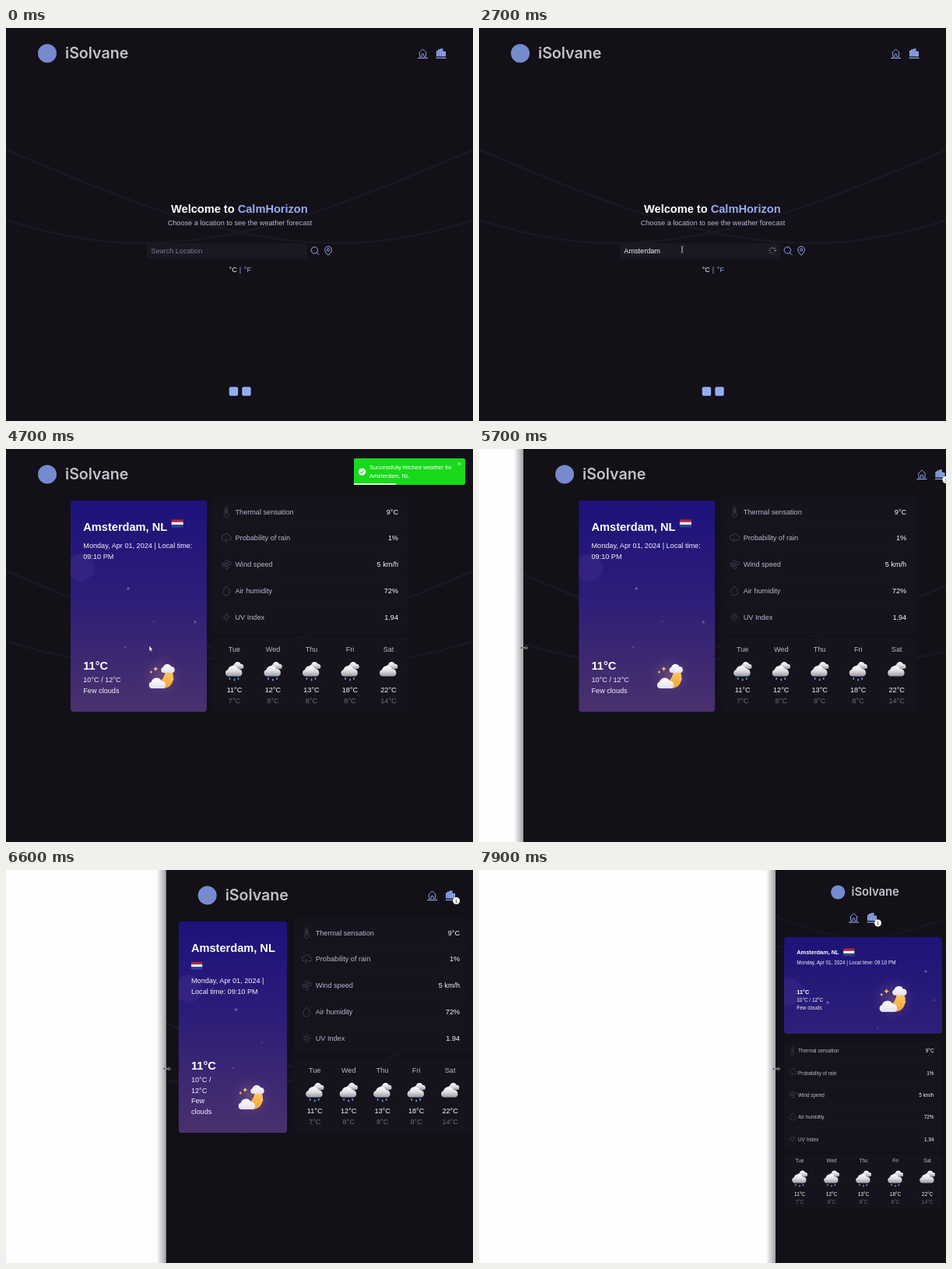
Recreate the animation shown at these times as an HTML page. Size 600 px wide and 504 px high, loop 8 s.

```html
<!DOCTYPE html>
<html lang="en">
<head>
<meta charset="utf-8">
<title>Weather app</title>
<style>
html, body { margin: 0; width: 100%; height: 100%; overflow: hidden; background: #131018; }
svg { display: block; width: 600px; height: 504px; font-family: "Liberation Sans", Arial, sans-serif; }
</style>
</head>
<body>
<svg viewBox="0 0 600 504">
  <defs>
    <linearGradient id="night" x2="0" y2="1">
      <stop stop-color="#1d127b"/><stop offset=".45" stop-color="#2d1d78"/><stop offset="1" stop-color="#4a316d"/>
    </linearGradient>
    <linearGradient id="nightWide" x2="0" y2="1">
      <stop stop-color="#1e1377"/><stop offset="1" stop-color="#2d2079"/>
    </linearGradient>
    <linearGradient id="puff" x2="0" y2="1">
      <stop stop-color="#fff"/><stop offset=".5" stop-color="#dedde2"/><stop offset="1" stop-color="#9b99a2"/>
    </linearGradient>
    <linearGradient id="white" x2="0" y2="1">
      <stop stop-color="#fff"/><stop offset="1" stop-color="#e3dfee"/>
    </linearGradient>
    <linearGradient id="gold" x2="0" y2="1">
      <stop stop-color="#ffd667"/><stop offset="1" stop-color="#f4a23a"/>
    </linearGradient>
    <radialGradient id="glow">
      <stop stop-color="#d8a08c" stop-opacity=".28"/><stop offset="1" stop-color="#8a5a90" stop-opacity="0"/>
    </radialGradient>
    <linearGradient id="shade">
      <stop stop-color="#000" stop-opacity="0"/><stop offset="1" stop-color="#000" stop-opacity=".36"/>
    </linearGradient>
    <path id="cloud" d="M-8,6 A4.5,4.5 0 0 1 -8,-2.5 A7,7 0 0 1 5,-3.5 A5,5 0 0 1 7.5,6Z"/>
    <g id="overcast">
      <use href="#cloud" fill="url(#puff)" transform="translate(5 -6) scale(.66)"/>
      <use href="#cloud" fill="url(#puff)" transform="translate(-.5 1.5)"/>
    </g>
    <path id="drops" d="M-6,10v1M0,11.5v1M5,10v1" stroke="#6f93d6" stroke-width="1.8" stroke-linecap="round"/>
    <g id="moonCloud">
      <circle r="27" fill="url(#glow)"/>
      <path d="M4,-13 C17,-9 18,8 9,14 C2,18 -8,16 -11,8 C0,10 6,0 4,-13Z" fill="url(#gold)"/>
      <use href="#cloud" fill="url(#white)" transform="translate(8 -9) scale(.82)"/>
      <use href="#cloud" fill="url(#white)" transform="translate(-5.5 10)"/>
      <path d="M-8,-12l1,2 2,1-2,1-1,2-1-2-2-1 2-1zM-14,-7l.7,1.3 1.3.7-1.3.7-.7,1.3-.7-1.3-1.3-.7 1.3-.7zM13,1l1,2 2,1-2,1-1,2-1-2-2-1 2-1z" fill="#f7c264"/>
    </g>
    <g id="flag">
      <rect width="15" height="3.4" fill="#b3283a"/><rect y="3.3" width="15" height="3.4" fill="#f2f0f4"/><rect y="6.6" width="15" height="3.4" fill="#2b4692"/>
    </g>
    <g id="home" fill="none" stroke="#93a8ea">
      <path d="M-5,-.5 L0,-5.5 L5,-.5 M-4,-1 V4 H-1.3 V.8 H1.3 V4 H4 V-1" stroke-width=".9"/><path d="M-6.5,6H6.5" stroke-width="1.2"/>
    </g>
    <g id="city">
      <path d="M-6,4V-3.5H-4V-5H-1V-6H2.5V-2.5H6V4Z" fill="#8fa8ee"/>
      <path d="M-4,-2v5.5M-1.8,-3.5v7M.8,-4.5v8M4,-1v4" stroke="#25243b" stroke-width=".7" stroke-dasharray="1 1.1"/>
      <path d="M-6.5,6H6.5" stroke="#93a8ea" stroke-width="1.2"/>
    </g>
    <path id="arrow" d="M0,-3.5v7l1.6-1.5 1.2,2.5 1-.5-1.2-2.3h2z" fill="#fff" stroke="#222" stroke-width=".4"/>
    <path id="beam" d="M-1.5,-4q1.5,0 1.5,1V3q0,1-1.5,1M1.5,-4q-1.5,0-1.5,1V3q0,1 1.5,1" fill="none" stroke="#aaa8b2" stroke-width=".8"/>
    <path id="resize" d="M-5,0l2.5-2v1.5h5v-1.5l2.5,2-2.5,2v-1.5h-5v1.5z" fill="#222" stroke="#ddd" stroke-width=".5"/>
    <clipPath id="cardClip"><rect id="clipBox" rx="4"/></clipPath>
  </defs>
  <g id="scene"></g>
</svg>
<script>
const LOOP = 8000, FRAME = 100;
const PAGE = '#131018', PANEL = '#16131d', RULE = '#1d1a27', ICON = '#3d3b54';
const PALE = '#b9b7cd', BRIGHT = '#f8f8fa', BLUE = '#97abf0', DIM = '#6d6b83';

const scene = document.getElementById('scene');
const clipBox = document.getElementById('clipBox');
const pen = document.createElement('canvas').getContext('2d');

const clamp = (v, lo = 0, hi = 1) => Math.min(hi, Math.max(lo, v));
const easeOut = k => 1 - (1 - k) ** 3;

// Piecewise linear interpolation through [time, value] pairs.
function track(t, keys) {
  if (t <= keys[0][0]) return keys[0][1];
  for (let i = 1; i < keys.length; i++) {
    const [t0, a] = keys[i - 1], [t1, b] = keys[i];
    if (t <= t1) return a + (b - a) * (t - t0) / (t1 - t0);
  }
  return keys[keys.length - 1][1];
}

const rect = (x, y, w, h, fill, extra = '') =>
  `<rect x="${x}" y="${y}" width="${w}" height="${h}" fill="${fill}" ${extra}/>`;
const use = (id, x, y, scale = 1) =>
  `<use href="#${id}" transform="translate(${x} ${y}) scale(${scale})"/>`;
const text = (s, x, y, size, fill, extra = '') =>
  `<text x="${x}" y="${y}" font-size="${size}" fill="${fill}" ${extra}>${s}</text>`;
const BOLD = 'font-weight="bold"', MID = 'text-anchor="middle"', END = 'text-anchor="end"';

function widthOf(s, size, bold) {
  pen.font = `${bold ? 'bold ' : ''}100px "Liberation Sans", Arial, sans-serif`;
  return pen.measureText(s).width * size / 100;
}

function wrap(s, room, size, bold) {
  const lines = [];
  for (const word of s.split(' ')) {
    const last = lines[lines.length - 1];
    const joined = `${last} ${word}`;
    if (last && widthOf(joined, size, bold) <= room) lines[lines.length - 1] = joined;
    else lines.push(word);
  }
  return lines;
}

const LAYOUTS = {
  wide: { big: 14.6, size: 9.13, cardTop: 66, cardBottom: 337, titleY: 105, dateGap: 22, lastUp: 24, tempGap: 16,
    nightUp: 46, nightScale: 1, rowY: 83.5, rowStep: 33.8, panelTop: 62, panelH: 174, inset: 27.5, dayY: 259.5, skyY: 284, skyScale: 1,
    highY: 312, lowY: 325.5, dayTop: 241, dayH: 96, pad: 36, logoY: 32.5, logoScale: 1, iconY: 32.5 },
  medium: { big: 9.13, size: 7.35, cardTop: 62, cardBottom: 315, titleY: 96, dateGap: 21, lastUp: 12.5, tempGap: 12,
    nightUp: 50, nightScale: .5, rowY: 79.5, rowStep: 33.8, panelTop: 58, panelH: 174, inset: 22, dayY: 253.5, skyY: 271, skyScale: .78,
    highY: 293.5, lowY: 304.5, dayTop: 236, dayH: 79, pad: 32, logoY: 30.5, logoScale: .88, iconY: 30.5 },
  narrow: { big: 7.35, size: 6.4, cardTop: 86, cardBottom: 210, titleY: 108, dateGap: 12.5, lastUp: 31.5, tempGap: 10.4,
    nightUp: 45, nightScale: 1.06, rowY: 234.3, rowStep: 28.3, panelTop: 220, panelH: 140, inset: 20, dayY: 374.5, skyY: 395, skyScale: .86,
    highY: 418, lowY: 428, dayTop: 364, dayH: 71, logoY: 28.5, logoScale: .755, iconY: 61 }
};

function frameOf(t) {
  const left = track(t, [[5350, 0], [5700, 57], [6200, 151], [7100, 274], [7900, 381]]);
  const mid = track(t, [[5350, 300.5], [5700, 345.7], [6200, 384.5], [7100, 440.5], [7900, 493.5]]);
  const width = 2 * (mid - left);
  const kind = width >= 351 ? 'wide' : width >= 292 ? 'medium' : 'narrow';
  return { left, mid, width, kind, ...LAYOUTS[kind] };
}

function curves(f) {
  const d = 'M-300.5,156 C-150,219 -20,276 130,276 C190,276 250,262 300,246.5';
  const fit = f.kind === 'narrow' ? 'translate(0 -52) scale(.6 .55)' : '';
  return `<g transform="translate(${f.mid} 0) ${fit}" fill="none" stroke="#1b1825" stroke-width="2.6">
    <path d="${d}"/><path d="${d}" transform="scale(-1 1)"/></g>`;
}

function header(f, badge) {
  const stacked = f.kind === 'narrow', half = (f.width - f.pad * 2) / 2;
  const x = stacked ? f.mid - 45.5 : f.mid - half - .5;
  const right = stacked ? f.mid + 18 : f.mid + half + .5;
  const cityX = right - 6.5;
  return `<g transform="translate(${x} ${f.logoY}) scale(${f.logoScale})">
      <circle cx="17.5" r="12" fill="#768bce"/>
      <text x="40.5" y="6" font-family="Inter, sans-serif" font-weight="600" font-size="19.6" fill="#c3c2c9">iSolvane</text></g>` +
    use('home', right - 30, f.iconY) + use('city', cityX, f.iconY) +
    (badge ? `<circle cx="${cityX + 7.5}" cy="${f.iconY + 7}" r="4.5" fill="#f4f4f6"/>` +
      text('1', cityX + 7.5, f.iconY + 9.2, 6, '#222', MID) : '');
}

function spinner(t) {
  let s = '';
  for (let i = 0; i < 8; i++) {
    const fade = ((i - Math.floor(t / FRAME)) % 8 + 8) % 8;
    s += `<path d="M0,-2.5V-5" transform="rotate(${i * 45})" stroke="#c9c8d4" opacity="${.15 + fade * .1}"/>`;
  }
  return `<g transform="translate(377 285.5)">${s}</g>`;
}

function homePage(t) {
  const typed = 'Amsterdam'.slice(0, clamp(Math.floor((t - 1700) / 700 * 9), 0, 9));
  let s = text(`Welcome to <tspan fill="${BLUE}">CalmHorizon</tspan>`, 212, 237, 14.6, '#fff', BOLD) +
    text('Choose a location to see the weather forecast', 300.5, 253, 9.13, PALE, MID) +
    rect(181, 276, 206, 20, '#1b1824', 'rx="3"') +
    text(typed || 'Search Location', 186.3, 289, 9.13, typed ? BRIGHT : '#7a788e') +
    text('°C', 286.5, 313, 9.13, BRIGHT) + text('|', 299.8, 313, 9.13, BLUE) + text('°F', 305.8, 313, 9.13, BLUE) +
    `<g fill="none" stroke="${BLUE}">
      <circle cx="396.3" cy="285" r="4.2"/><path d="M399.4,288.2l3,3"/>
      <path d="M414,291.5q-4.4,-4.2-4.4,-7a4.4,4.4 0 0 1 8.8,0q0,2.8-4.4,7z"/><circle cx="414" cy="284.5" r="1.6"/></g>` +
    rect(286.7, 460.3, 11.4, 11.4, '#92adf3', 'rx="2"') + rect(303.3, 460.3, 11.4, 11.4, '#92adf3', 'rx="2"');
  const caret = (t >= 1000 && t < 1200) || (t >= 1800 && t < 2700);
  if (caret) s += rect(186.8 + widthOf(typed, 9.13), 281, .7, 10, '#e8e8ee');
  if (t >= 2700) s += spinner(t);
  if (t >= 100) {
    const k = easeOut(clamp((t - 100) / 800));
    const x = 320 - 59 * k, y = 374 - 90 * k;
    s += use(y < 296 ? 'beam' : 'arrow', x, y);
  }
  return s;
}

const ROWS = [
  ['Thermal sensation', '9°C', 'M-1.5,-5a1.5,1.5 0 0 1 3,0V1.5a3,3 0 1 1 -3,0ZM0,-3V4'],
  ['Probability of rain', '1%', 'M-3,2.5a3,3 0 0 1 0,-6a4,4 0 0 1 7.5,1a2.5,2.5 0 0 1 -.5,5H1M0,0l-2,3h2l-1.5,3'],
  ['Wind speed', '5 km/h', 'M-6,-1.5H0a2,2 0 1 0 -2,-2M-6,.5H4a2,2 0 1 0 -2,-2M-5,2.5H1a1.7,1.7 0 1 1 -1.7,1.7'],
  ['Air humidity', '72%', 'M0,-6q4.5,4.5 4.5,7.5a4.5,4.5 0 0 1 -9,0q0,-3 4.5,-7.5z'],
  ['UV Index', '1.94', 'M-2.5,0a2.5,2.5 0 1 0 5,0a2.5,2.5 0 1 0 -5,0M0,-4v-2M0,4v2M-4,0h-2M4,0h2M-3,-3l-1.3,-1.3M3,3l1.3,1.3M-3,3l-1.3,1.3M3,-3l1.3,-1.3']
];
const DAYS = [['Tue', 11, 7], ['Wed', 12, 8], ['Thu', 13, 8], ['Fri', 18, 8], ['Sat', 22, 14]];

function card(f, x, w) {
  const narrow = f.kind === 'narrow', { size, big, cardTop: top, cardBottom: bottom } = f;
  const textX = x + 16.3, room = w - 26.5, lead = size * 1.5;
  Object.entries({ x, y: top, width: w, height: bottom - top }).forEach(([k, v]) => clipBox.setAttribute(k, v));

  let s = rect(x, top, w, bottom - top, narrow ? 'url(#nightWide)' : 'url(#night)');
  s += `<circle cx="${x + (narrow ? 6 : 13)}" cy="${top + (narrow ? 70 : 86)}" r="17.5" fill="#5b3f99" opacity=".22"/>`;
  const stars = narrow ? [[56, 84], [182, 44], [193, 81], [120, 117]] : [[74, 113], [160, 156], [70, 188], [107, 155]];
  stars.forEach(([dx, dy], i) => {
    s += `<circle cx="${x + dx}" cy="${top + dy}" r="${i < 2 ? 1.7 : 1.2}" fill="#8b79ad" opacity="${.75 - i * .15}"/>`;
  });

  let y = f.titleY;
  const title = wrap('Amsterdam, NL', room, big, true);
  title.forEach((line, i) => { s += text(line, textX, y + i * big * 1.25, big, '#fff', BOLD); });
  y += (title.length - 1) * big * 1.25;
  const titleW = widthOf(title[title.length - 1], big, true);
  if (titleW + 20 <= room) {
    s += use('flag', textX + titleW + 5.5, y - (narrow ? 7.3 : 14.5), narrow ? .95 : 1);
  } else {
    s += use('flag', textX, y + 13, .95);
    y += 18;
  }
  y += f.dateGap;
  wrap('Monday, Apr 01, 2024 | Local time: 09:10 PM', narrow ? w : room, size)
    .forEach((line, i) => { s += text(line, textX, y + i * lead, size, '#f4f2fa'); });

  const side = w * .5 - 25;
  const facts = [...wrap('10°C / 12°C', side, size), ...wrap('Few clouds', side, size)];
  const firstY = bottom - f.lastUp - (facts.length - 1) * lead;
  facts.forEach((line, i) => { s += text(line, textX, firstY + i * lead, size, '#f4f2fa'); });
  s += text('11°C', textX, firstY - f.tempGap, big, '#fff', BOLD);
  s += use('moonCloud', x + w * (narrow ? .69 : .67), bottom - f.nightUp, f.nightScale);
  return `<g clip-path="url(#cardClip)">${s}</g>`;
}

function details(f, x, w) {
  const narrow = f.kind === 'narrow', right = x + w - (narrow ? 10.5 : 14);
  let s = rect(x, f.panelTop, w, f.panelH, PANEL, 'rx="4"');
  ROWS.forEach(([label, value, icon], i) => {
    const y = f.rowY + i * f.rowStep;
    s += `<path d="${icon}" transform="translate(${x + (narrow ? 11 : 17)} ${y - 3}) scale(${narrow ? .8 : 1})" fill="none" stroke="${ICON}"/>` +
      text(label, x + (narrow ? 18 : 28.5), y, f.size, PALE) + text(value, right, y, f.size, BRIGHT, END);
    if (i < 4) s += rect(x + 8, y + f.rowStep * .37, w - 16, .8, RULE);
  });
  return s;
}

function forecast(f, x, w) {
  let s = rect(x, f.dayTop, w, f.dayH, PANEL, 'rx="4"');
  DAYS.forEach(([day, high, low], i) => {
    const cx = x + f.inset + i * (w - f.inset * 2 + 1) / 4;
    s += text(day, cx, f.dayY, f.size, PALE, MID) + use('overcast', cx, f.skyY, f.skyScale) +
      (i < 4 ? use('drops', cx, f.skyY, f.skyScale) : '') +
      text(high + '°C', cx, f.highY, f.size, BRIGHT, MID) + text(low + '°C', cx, f.lowY, f.size, DIM, MID);
  });
  return s;
}

function weatherPage(f) {
  const inner = f.kind === 'wide' ? Math.min(435, f.width - 32) : f.width - (f.kind === 'medium' ? 19 : 22);
  const x = f.kind === 'wide' ? f.mid - inner / 2 : f.left + 11;
  if (f.kind === 'narrow') return card(f, x, inner) + details(f, x, inner) + forecast(f, x, inner);
  const w = 175 - (435 - inner) * .595, sideX = x + w + 8, sideW = inner - w - 8;
  return card(f, x, w) + details(f, sideX, sideW) + forecast(f, sideX, sideW);
}

function toast(t) {
  if (t < 3700 || t >= 5500) return '';
  const slide = 156 * (1 - easeOut(clamp((t - 3600) / 400))) + 160 * clamp((t - 5200) / 300) ** 2;
  const bar = 143 * clamp(1 - (t - 3770) / 1500);
  return `<g transform="translate(${slide} 0)">` + rect(447, 12, 143, 34, '#18d91a', 'rx="2"') +
    '<circle cx="457.5" cy="29.3" r="4.6" fill="#fff"/><path d="M455.4,29.3l1.6,1.7 2.8,-3.2" fill="none" stroke="#18d91a" stroke-width="1.1"/>' +
    text('Successfully fetched weather for', 467, 25.6, 7.35, '#fff') + text('Amsterdam, NL', 467, 37.2, 7.35, '#fff') +
    '<path d="M580.5,17l4,4m0,-4l-4,4" stroke="#d5f6d5" stroke-width=".8"/>' +
    rect(447, 44, bar, 2, '#d2f8d2') + '</g>';
}

function pointer(t, f) {
  if (f.left > 0) return use('resize', f.left + 1, 255);
  const x = track(t, [[3700, 261], [4500, 186], [4700, 186], [5300, 2]]);
  const y = track(t, [[3700, 284], [4500, 256], [5300, 255]]);
  return use('arrow', x - 2, y);
}

function draw(t) {
  const f = frameOf(t), searched = t >= 3700;
  let s = rect(0, 0, 600, 504, PAGE) + curves(f) + header(f, searched);
  s += searched ? weatherPage(f) + toast(t) : homePage(t);
  if (f.left > 0) {
    s += rect(0, 0, f.left, 504, '#fdfcfe') + rect(f.left - 12, 0, 12, 504, 'url(#shade)');
  }
  if (searched) s += pointer(t, f);
  scene.innerHTML = s;
}

let shown = -1;
function tick() {
  const t = Math.floor(performance.now() % LOOP / FRAME) * FRAME;
  if (t !== shown) draw(shown = t);
  requestAnimationFrame(tick);
}
tick();
</script>
</body>
</html>
```
